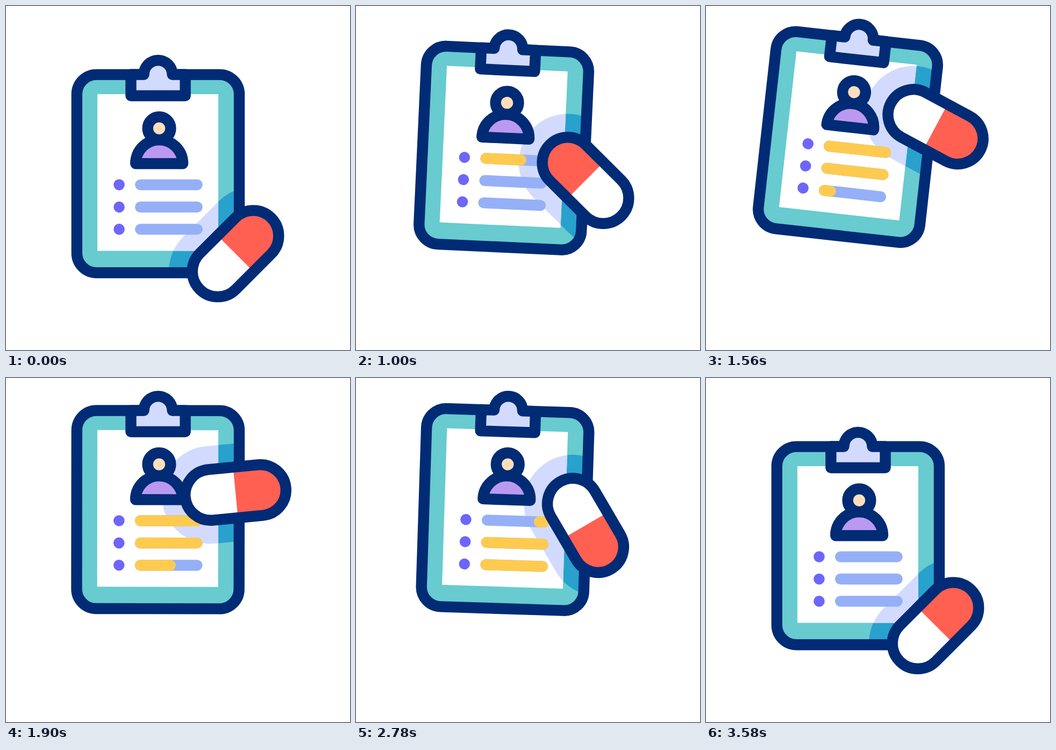
These frames come from a looping animation (640x640 px, 3.6 s). An HTML page:

```html
<!DOCTYPE html>
<html lang="en">
<head>
<meta charset="utf-8">
<title>Prescription</title>
<style>
  html, body { margin: 0; width: 100%; height: 100%; overflow: hidden; background: #fff; }
  svg { display: block; width: 100vw; height: 100vh; }
  .ink { stroke: #022b75; stroke-width: 20.4; stroke-linejoin: round; }
  .bar { stroke-width: 20.4; stroke-linecap: round; fill: none; }
</style>
</head>
<body>
<svg viewBox="0 0 640 640">
  <defs>
    <clipPath id="inBoard"><rect x="131.8" y="127.6" width="302.2" height="368.6" rx="36.5"/></clipPath>
    <clipPath id="inPaper"><rect x="170" y="164" width="225" height="291.5"/></clipPath>
  </defs>
  <g id="board">
    <rect x="131.8" y="127.6" width="302.2" height="368.6" rx="36.5" fill="#67cbd0"/>
    <g clip-path="url(#inBoard)"><rect class="shade" x="-137.8" y="-91" width="275.6" height="182" rx="91" fill="#28a1cd"/></g>
    <rect x="170" y="164" width="225" height="291.5" fill="#fff"/>
    <g clip-path="url(#inPaper)"><rect class="shade" x="-137.8" y="-91" width="275.6" height="182" rx="91" fill="#d2dbff"/></g>
    <rect class="ink" x="131.8" y="127.6" width="302.2" height="368.6" rx="36.5" fill="none"/>
    <path class="ink" d="M232.4 127.5H256.5A26.5 26.5 0 0 1 309.5 127.5H333.6V167H232.4Z" fill="#d2dbff"/>
    <path class="ink" d="M241.2 293.3A43.9 44.2 0 0 1 329 293.3Z" fill="#bb99f1"/>
    <circle class="ink" cx="285" cy="227.6" r="21.4" fill="#ffdfbb"/>
    <g id="list"></g>
  </g>
  <g id="pill">
    <rect x="-94" y="-47.3" width="188" height="94.6" rx="47.3" fill="#fff"/>
    <path d="M0 -47.3H46.8A47.3 47.3 0 0 1 46.8 47.3H0Z" fill="#ff6052"/>
    <rect class="ink" x="-94" y="-47.3" width="188" height="94.6" rx="47.3" fill="none"/>
  </g>
</svg>
<script>
const LOOP = 3600;
const LEFT = 250.2, SPAN = 105.4, PIVOT = '283 142';
const $ = id => document.getElementById(id);
const smooth = p => p * p * (3 - 2 * p);

// Cubic bezier with handles (a,0) and (b,1)
const bezier = (a, b) => p => {
  let lo = 0, hi = 1;
  for (let i = 0; i < 24; i++) {
    const s = (lo + hi) / 2, r = 1 - s;
    if (3 * r * r * s * a + 3 * r * s * s * b + s * s * s < p) lo = s; else hi = s;
  }
  return smooth(lo);
};

// keys: [time, value, easing into this key]
function track(keys, t) {
  if (t <= keys[0][0]) return keys[0][1];
  for (let i = 1; i < keys.length; i++) {
    const [t0, v0] = keys[i - 1], [t1, v1, ease = smooth] = keys[i];
    if (t < t1) return v0 + (v1 - v0) * ease((t - t0) / (t1 - t0));
  }
  return keys[keys.length - 1][1];
}

const boardY = [[170, 0], [520, 30], [584, 30], [1187, -67, bezier(.219, .667)], [2804, -67], [3450, 0]];
const boardTilt = [[694, 0], [1436, 7.1], [2275, -5], [2950, 3.1], [3570, 0]];
const pillY = [[170, 460.7], [409, 490.7], [1847, 213, bezier(.167, .424)], [2417, 213], [3540, 460.7]];
const pillTurn = [[565, -45], [1812, -365.5], [2450, -365.5], [3592, -45]];

const rows = [
  { y: 332.6, fill: [670, 1240], clear: [2310, 2880] },
  { y: 374, fill: [1010, 1540], clear: [2780, 3190] },
  { y: 415.4, fill: [1335, 2426], clear: [3010, 3420] }
];

function add(tag, attrs) {
  const el = document.createElementNS('http://www.w3.org/2000/svg', tag);
  for (const k in attrs) el.setAttribute(k, attrs[k]);
  return $('list').appendChild(el);
}

for (const row of rows) {
  add('circle', { cx: 210.5, cy: row.y, r: 10.3, fill: '#6c66fb' });
  add('path', { class: 'bar', stroke: '#95b0f6', d: `M${LEFT} ${row.y}h${SPAN}` });
  row.mark = add('path', { class: 'bar', stroke: '#fecb50' });
}

const shades = document.querySelectorAll('.shade');

function draw(t) {
  const y = track(boardY, t), tilt = track(boardTilt, t);
  const pill = `translate(427 ${track(pillY, t)}) rotate(${track(pillTurn, t)})`;
  $('board').setAttribute('transform', `translate(0 ${y}) rotate(${tilt} ${PIVOT})`);
  $('pill').setAttribute('transform', pill);
  // The shade follows the pill, so undo the board's own motion
  for (const s of shades) s.setAttribute('transform', `rotate(${-tilt} ${PIVOT}) translate(0 ${-y}) ${pill}`);

  for (const { y, fill, clear, mark } of rows) {
    const end = track([[fill[0], 0], [fill[1], 1]], t);
    const start = track([[clear[0], 0], [clear[1], 1]], t);
    const shown = end - start > 0.001;
    mark.setAttribute('d', shown ? `M${LEFT + SPAN * start} ${y}h${SPAN * (end - start)}` : '');
  }
}

function tick() {
  draw(performance.now() % LOOP);
  requestAnimationFrame(tick);
}
tick();
</script>
</body>
</html>
```
